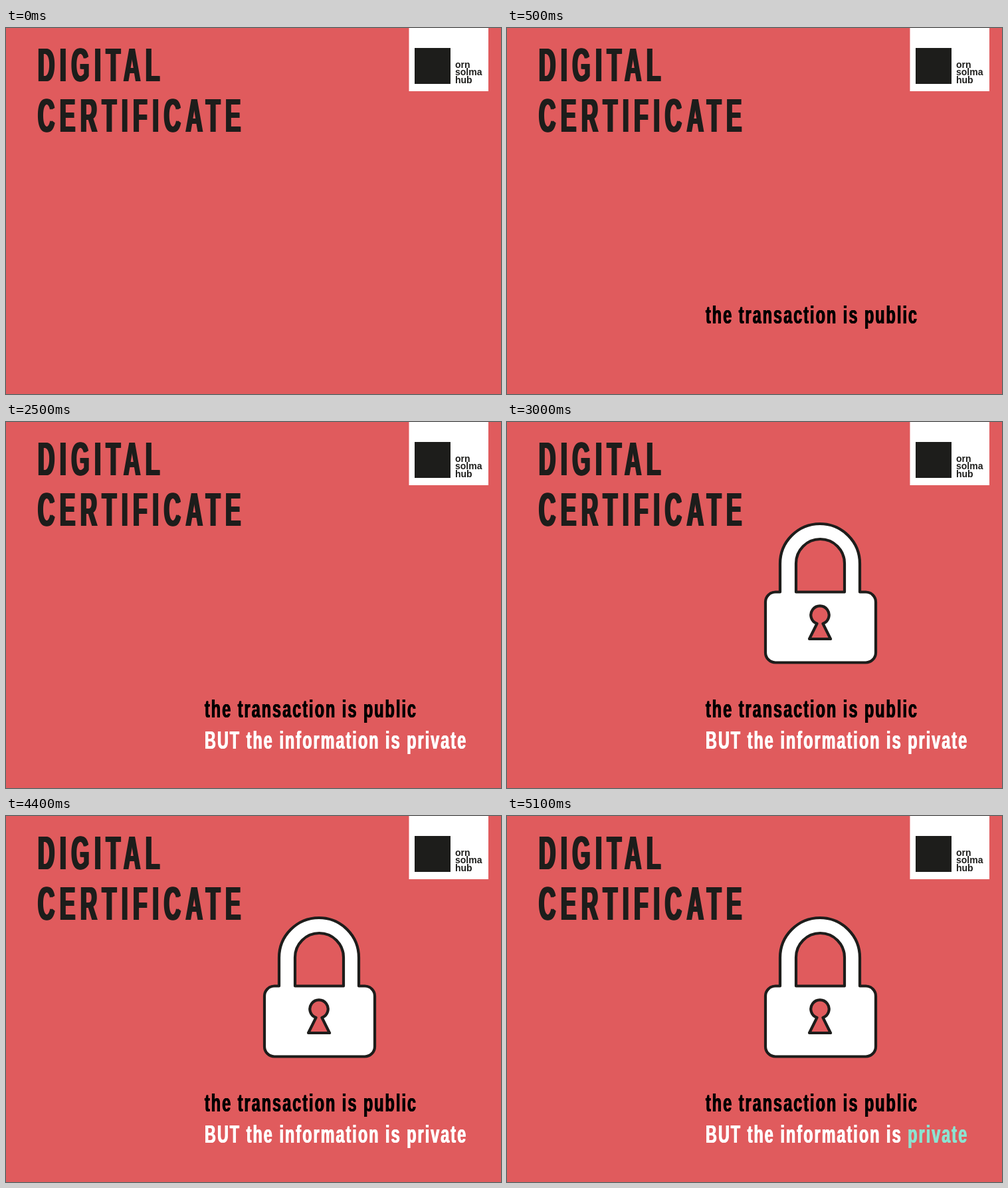
Recreate the animation shown at these times as an HTML page. Size 745x550 px, loop 5800 ms.

```html
<!DOCTYPE html>
<html lang="en">
<head>
<meta charset="utf-8">
<title>Digital certificate</title>
<style>
  html, body { margin: 0; width: 100%; height: 100%; overflow: hidden; background: #e05b5d; }
  body { position: relative; font-family: "Liberation Sans", Arial, sans-serif; font-weight: bold; color: #1d1d1b; }
  svg, div { position: absolute; white-space: nowrap; }
  svg { left: 0; top: 0; }
  .art { fill: #fff; fill-rule: evenodd; stroke: #1d1d1b; stroke-width: 4.2; stroke-linejoin: round; }
  /* Condensed bold look: narrow the face, thicken its stems sideways. */
  .title, .line { transform-origin: 0 0; }
  .title {
    left: 47.5px; top: 18.4px; font-size: 71px; line-height: 76px; letter-spacing: 15.9px;
    transform: scaleX(.49); text-shadow: 3px 0, -3px 0;
  }
  .line {
    left: 298.7px; font-size: 37px; line-height: 47px; letter-spacing: 3.3px;
    transform: scaleX(.63); text-shadow: .8px 0, -.8px 0;
  }
  #open { top: 407.7px; color: #000; }
  #closed { top: 454.7px; color: #fff; }
  .name { left: 676px; top: 49.5px; font-size: 14px; line-height: 11.5px; }
</style>
</head>
<body>
<svg width="745" height="550">
  <path d="M606.5 0H726V95H606.5z" fill="#fff"/>
  <path d="M615 30h54v54h-54z" fill="#1d1d1b"/>
  <g id="arrows" class="art">
    <path id="arrow" d="M358 224L421 160V192H507V257H421V288z"/>
    <use href="#arrow" transform="rotate(180 471.5 262)"/>
  </g>
  <path id="lock" class="art" d="M411 255.5V213A60 60 0 0 1 531 213V255.5H540A15 15 0 0 1 555 270.5V346.5A15 15 0 0 1 540 361.5H404A15 15 0 0 1 389 346.5V270.5A15 15 0 0 1 404 255.5z
    M435 255.5V212.5A36.5 36.5 0 0 1 508 212.5V255.5z
    M466.5 303A13.7 13.7 0 1 1 475.5 303L487 326H455z"/>
</svg>
<div class="title">DIGITAL<br>CERTIFICATE</div>
<div class="name">orn<br>solma<br>hub</div>
<div id="open" class="line">the transaction is public</div>
<div id="closed" class="line">BUT the information is <span id="word">private</span></div>
<script>
  const LOOP = 5800, BLINK = 700;
  const spans = { open: [500, LOOP], arrows: [1500, 2500], closed: [2500, LOOP], lock: [3000, LOOP] };
  const el = id => document.getElementById(id);

  function draw() {
    const t = performance.now() % LOOP;
    for (const [id, [from, to]] of Object.entries(spans))
      el(id).style.visibility = t >= from && t < to ? "visible" : "hidden";
    const lit = t >= 3000 && Math.floor((t - 3000) / BLINK) % 2 === 1;
    el("word").style.color = lit ? "#8ce3d0" : "#fff";
    requestAnimationFrame(draw);
  }
  draw();
</script>
</body>
</html>
```
